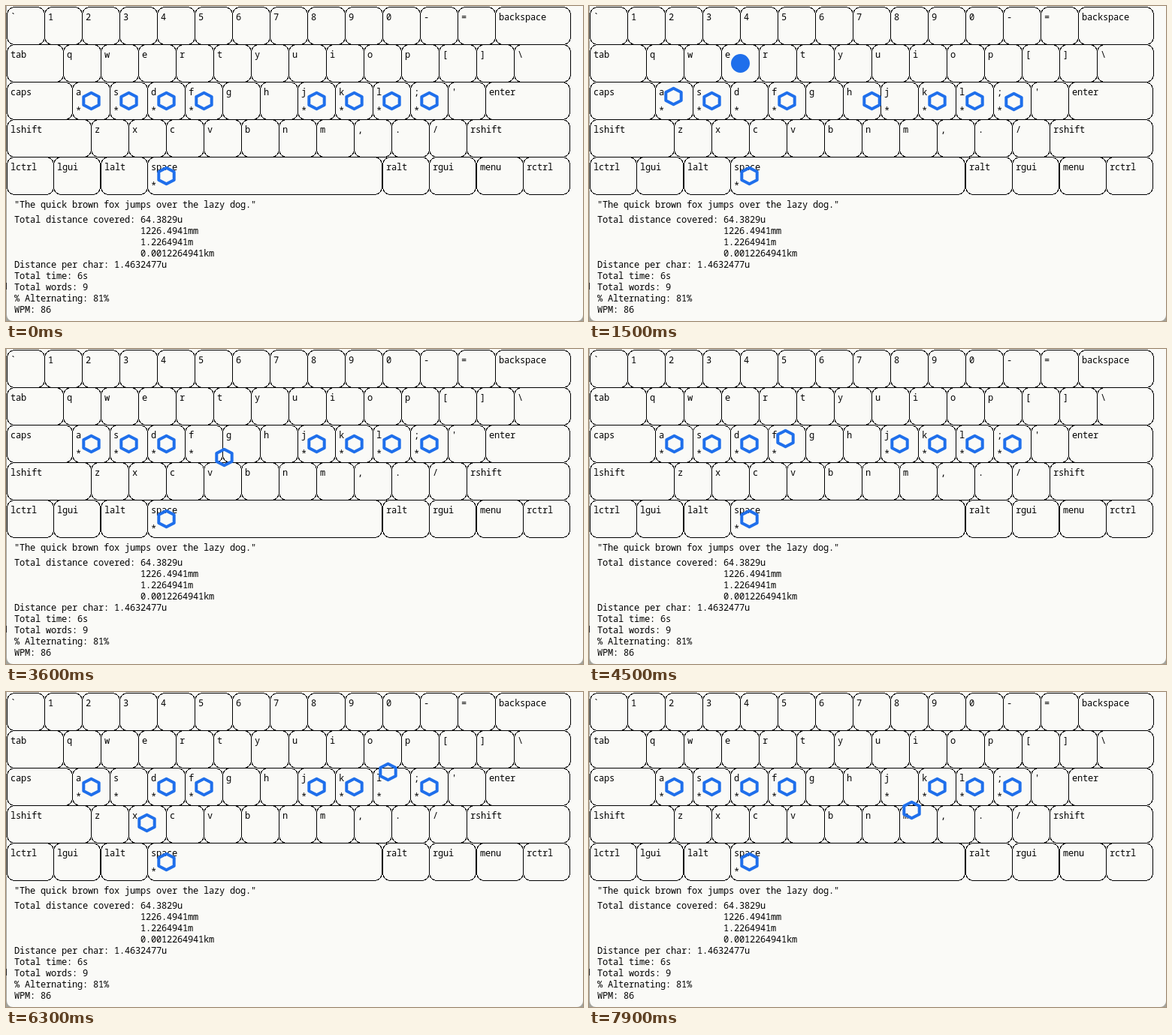
Animation, 768 px wide and 420 px high, one loop 8000 ms. Source, as an HTML page:

```html
<!DOCTYPE html>
<html lang="en">
<head>
<meta charset="utf-8">
<title>Typing simulation</title>
<style>
  html, body { margin: 0; width: 100%; height: 100%; overflow: hidden; background: #a3a39c; }
  svg { display: block; }
  text { font: 12px "Noto Sans Mono", "DejaVu Sans Mono", monospace; letter-spacing: -0.2px; white-space: pre; }
  .key { fill: none; stroke: #000; shape-rendering: crispEdges; }
  .finger { fill: none; stroke: #1f6feb; stroke-width: 4; stroke-linejoin: round; }
  .finger.down { fill: #1f6feb; }
</style>
</head>
<body>
<svg id="stage" width="768" height="420" viewBox="0 0 768 420">
  <rect x="1" y="-20" width="767" height="440" rx="8" fill="#fafaf7"/>
  <rect y="369" width="1" height="9" fill="#222"/>
</svg>
<script>
const stage = document.getElementById('stage');
const UNIT = 50, LOOP = 8000, STEP = 100;
const SPEED = 0.2;  // px per ms
const HOLD = 125;   // ms a key stays down

// Keys are one unit wide unless given as label:width
const rows = [
  '` 1 2 3 4 5 6 7 8 9 0 - = backspace:2',
  'tab:1.5 q w e r t y u i o p [ ] \\:1.5',
  "caps:1.75 a s d f g h j k l ; ' enter:2.25",
  'lshift:2.25 z x c v b n m , . / rshift:2.75',
  'lctrl:1.25 lgui:1.25 lalt:1.25 space:6.25 ralt:1.25 rgui:1.25 menu:1.25 rctrl:1.25'
];
const homes = ['a', 's', 'd', 'f', 'j', 'k', 'l', ';', 'space'];

// finger, key, time the key goes down
const presses = [
  ['f', 't', 935], [';', 'rshift', 935], ['j', 'h', 1310], ['d', 'e', 1440], ['space', 'space', 1570],
  ['a', 'q', 1726], ['j', 'u', 1983], ['k', 'i', 2639], ['d', 'c', 2968], ['k', 'k', 3110], ['space', 'space', 3310],
  ['f', 'b', 3888], ['f', 'r', 4721], ['l', 'o', 4980], ['s', 'w', 5241], ['j', 'n', 5517], ['space', 'space', 5642],
  ['f', 'f', 5767], ['l', 'o', 6021], ['s', 'x', 6311], ['space', 'space', 6650],
  ['j', 'j', 6930], ['j', 'u', 7344], ['j', 'm', 8006]
];

function add(tag, attrs, content = '') {
  const el = document.createElementNS('http://www.w3.org/2000/svg', tag);
  for (const name in attrs) el.setAttribute(name, attrs[name]);
  el.textContent = content;
  return stage.appendChild(el);
}
const write = (x, y, content) => add('text', { x, y }, content);

const spots = {};
rows.forEach((row, r) => {
  let left = 1;
  const y = 1 + r * UNIT;
  for (const item of row.split(' ')) {
    const [label, size = 1] = item.split(':');
    const x = Math.floor(left), width = Math.floor(size * UNIT);
    add('rect', { class: 'key', x: x + 0.5, y: y + 0.5, width, height: UNIT, rx: 10 });
    write(x + 5, y + 18, label);
    if (homes.includes(label)) write(x + 5, y + 43, '*');
    spots[label] = { x: x + UNIT / 2, y: y + UNIT / 2 };
    left += size * UNIT;
  }
});

write(11, 269, '"The quick brown fox jumps over the lazy dog."');
[
  'Total distance covered: 64.3829u',
  '1226.4941mm', '1.2264941m', '0.0012264941km',
  'Distance per char: 1.4632477u',
  'Total time: 6s',
  'Total words: 9',
  '% Alternating: 81%',
  'WPM: 86'
].forEach((line, i) => write(i > 0 && i < 4 ? 179 : 11, 289 + 15 * i, line));

const hexagon = 'M0 -10.8L10.2 -5.4V5.4L0 10.8L-10.2 5.4V-5.4Z';
const disc = 'M10.5 0A10.5 10.5 0 1 1 -10.5 0A10.5 10.5 0 1 1 10.5 0Z';
const fingers = homes.map(home => ({
  home: spots[home],
  moves: presses.filter(p => p[0] === home).map(([, key, time]) => {
    const dx = spots[key].x - spots[home].x, dy = spots[key].y - spots[home].y;
    return { dx, dy, time, travel: Math.hypot(dx, dy) / SPEED };
  }),
  el: add('path', { class: 'finger' })
}));

// Go out, hold the key, come back at the same constant speed
function pose({ home, moves, el }, t) {
  let { x, y } = home, down = false;
  for (const m of moves) {
    const since = t - m.time;
    if (since <= -m.travel || since >= m.travel + HOLD) continue;
    const gap = Math.max(-since, since - HOLD, 0);
    const reach = gap ? 1 - gap / m.travel : 1;
    x += m.dx * reach;
    y += m.dy * reach;
    down = down || gap === 0;
  }
  // Shapes are centred on whole pixels
  el.setAttribute('transform', `translate(${Math.round(x) + 0.5} ${Math.round(y) + 0.5})`);
  el.setAttribute('d', down ? disc : hexagon);
  el.classList.toggle('down', down);
}

const start = performance.now();
function frame() {
  const t = Math.floor((performance.now() - start) % LOOP / STEP) * STEP;
  fingers.forEach(finger => pose(finger, t));
  requestAnimationFrame(frame);
}
frame();
</script>
</body>
</html>
```
